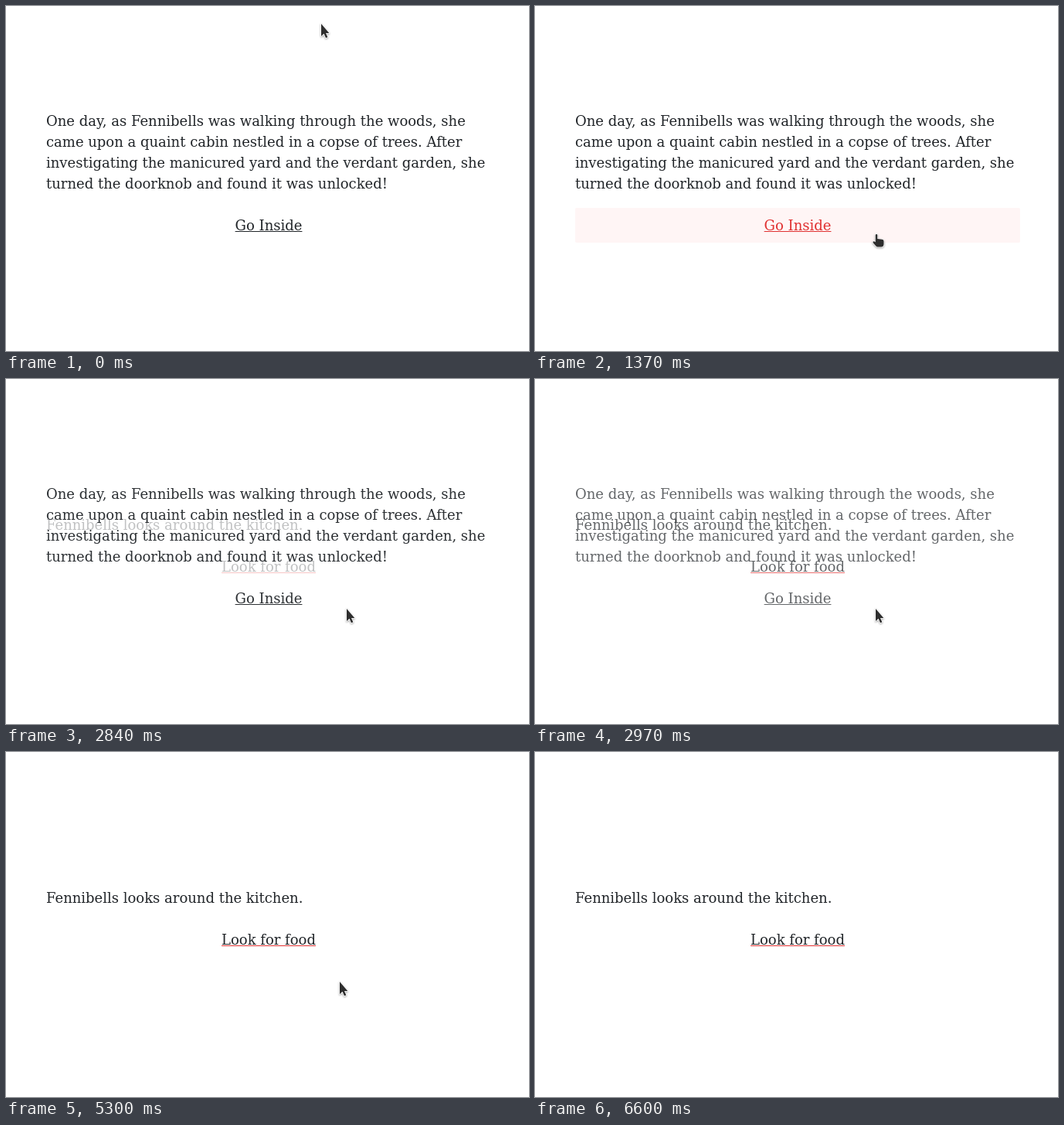
These frames come from a looping animation (677 by 446 pixels, 7.44 s). An HTML page:

```html
<!DOCTYPE html>
<html lang="en">
<head>
<meta charset="utf-8">
<title>Story passage</title>
<style>
html, body { margin: 0; width: 100%; height: 100%; overflow: hidden; background: #fff; }
body { position: relative; font: 18px/27px "DejaVu Serif", serif; color: #212529; cursor: none; }
.passage { position: absolute; left: 52px; width: 576px; }
#yard { top: 135px; }
#kitchen { top: 175px; opacity: 0; }
p { margin: 0 0 18px; white-space: nowrap; }
.link { padding: 9px 0; text-align: center; text-decoration: underline; border-radius: 2px; }
#kitchen .link { text-decoration-color: #e03131; }
.link.hover { color: #e03131; background: #fff5f5; }
svg { position: absolute; left: 0; top: 0; width: 677px; height: 446px; }
#cursor { filter: drop-shadow(0.5px 1px 1px rgba(0, 0, 0, .35)); }
#cursor path { fill: #2e2e2e; stroke: #fff; stroke-width: 1.6; stroke-linejoin: round; paint-order: stroke; }
</style>
</head>
<body>
<div class="passage" id="yard">
  <p>One day, as Fennibells was walking through the woods, she<br>came upon a quaint cabin nestled in a copse of trees. After<br>investigating the manicured yard and the verdant garden, she<br>turned the doorknob and found it was unlocked!</p>
  <div class="link">Go Inside</div>
</div>
<div class="passage" id="kitchen">
  <p>Fennibells looks around the kitchen.</p>
  <div class="link">Look for food</div>
</div>
<svg><g id="cursor">
  <path id="arrow" d="M0 0V16L3.5 12.8L6 18.3L8.4 17.2L6 12H10.3Z"/>
  <path id="beam" d="M-3.5 -8H-1L0 -7.3L1 -8H3.5V-6.6H1.4L.7 -6V6L1.4 6.6H3.5V8H1L0 7.3L-1 8H-3.5V6.6H-1.4L-.7 6V-6L-1.4 -6.6H-3.5Z"/>
  <path id="hand" d="M-.3 -.8Q-.3 -2 1 -2Q2.3 -2 2.3 -.8V4L8.5 4.8Q10.5 5.2 10.5 7V10.5Q10.5 14.5 7 14.5H3Q1.2 14.5 0 13L-3.3 9.2Q-4 8 -3 7.3Q-2 6.8 -.3 8.2Z"/>
</g></svg>
<script>
const LOOP = 7440, SWAP = 2740;
const $ = id => document.getElementById(id);
const yard = $('yard'), kitchen = $('kitchen');

// start, end, steps, then from, control and to points
const legs = [
  [500, 700, 6, [408, 23], [380, 110], [433, 200.5]],
  [940, 1370, 12, [433, 200.5], [437, 249], [441, 297]],
  [5300, 5300, 1, [441, 297], [436, 297], [432, 297]],
  [5500, 6170, 16, [432, 297], [243, 147], [54, -2]],
  [6540, 6600, 3, [54, -2], [55, -12], [56, -24]]
];

function pointer(t) {
  let leg = legs[0];
  for (const next of legs) if (t >= next[0]) leg = next;
  const [start, end, steps, from, control, to] = leg;
  if (t < start) return from;
  const step = t >= end ? steps : Math.floor((t - start) / (end - start) * (steps - 1)) + 1;
  const u = step / steps, s = u * u * (3 - 2 * u);
  return from.map((a, i) => a * (1 - s) ** 2 + 2 * control[i] * s * (1 - s) + to[i] * s * s);
}

// The crossfade advances in 40 ms steps and pauses twice
function fade(t) {
  if (t < 2770) return 0;
  if (t >= 5300) return 1;
  const at = t < 2970 ? t - (t - 2770) % 40 : t < 3140 ? 2970 : t < 3200 ? 3140 : 3200;
  return (at - 2725) / 490;
}

const easeOut = p => 1 - (1 - p) ** 1.7;

function draw(now) {
  const t = now % LOOP, [x, y] = pointer(t), p = fade(t);
  yard.style.opacity = easeOut(1 - p);
  kitchen.style.opacity = easeOut(p);

  const first = t < SWAP;
  const top = first ? 135 : 175, textEnd = first ? 243 : 202;
  const inside = x >= 52 && x < 628;
  const onText = inside && y >= top && y < textEnd;
  const onLink = inside && y >= textEnd + 18 && y < textEnd + 63;
  yard.lastElementChild.classList.toggle('hover', first && onLink);
  kitchen.lastElementChild.classList.toggle('hover', !first && onLink);

  const shape = onLink ? 'hand' : onText ? 'beam' : 'arrow';
  for (const id of ['arrow', 'beam', 'hand']) $(id).style.display = id === shape ? '' : 'none';
  $('cursor').setAttribute('transform', `translate(${Math.round(x)} ${Math.round(y)})`);
}

const origin = performance.now();
function tick() {
  draw(performance.now() - origin);
  requestAnimationFrame(tick);
}
tick();
</script>
</body>
</html>
```
